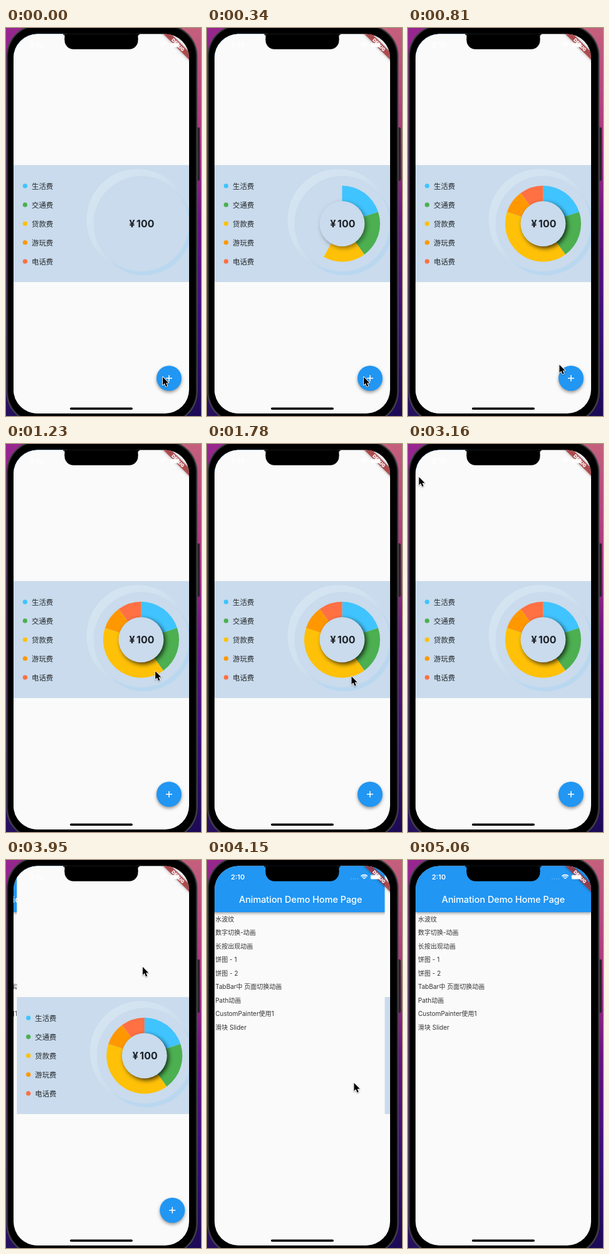
An HTML page with a canvas for the animation above (5160 ms loop, 311 px wide and 617 px high).

```html
<!DOCTYPE html>
<html lang="zh">
<head>
<meta charset="utf-8">
<style>
  html, body { margin: 0; width: 100%; height: 100%; overflow: hidden; background: #000; }
  canvas { display: block; width: 311px; height: 617px; }
</style>
</head>
<body>
<canvas id="stage"></canvas>
<script>
const W = 311, H = 617, LOOP = 5160, TURN = 2 * Math.PI;
const CJK = "'Noto Sans CJK SC', 'Noto Sans CJK', sans-serif";
const SANS = `Inter, ${CJK}`;
const SCREEN = { x: 12, y: 9.5, w: 280, h: 603.5, r: 38 };
const PAPER = '#fafafa', PANEL = '#c9dbec', BLUE = '#2196f3';
const PIE = { x: 215.5, y: 311.2, r: 60.5, hole: 36 };

const canvas = document.getElementById('stage');
const dpr = window.devicePixelRatio || 1;
canvas.width = W * dpr;
canvas.height = H * dpr;
const c = canvas.getContext('2d');

const EXPENSES = [
  ['生活费', '#40c4ff', 0.2],
  ['交通费', '#4caf50', 0.2],
  ['贷款费', '#ffc107', 0.4],
  ['游玩费', '#ff9800', 0.1],
  ['电话费', '#ff7043', 0.1],
];
const MENU = ['水波纹', '数字切换-动画', '长按出现动画', '饼图 - 1', '饼图 - 2',
  'TabBar中 页面切换动画', 'Path动画', 'CustomPainter使用1', '滑块 Slider'];

// Where the pointer rests or turns
const POINTER = [
  { t: 480, x: 250, y: 555 },
  { t: 810, x: 241.5, y: 535.5 },
  { t: 960, x: 187, y: 281 },
  { t: 1170, x: 251, y: 390 },
  { t: 1290, x: 226, y: 334 },
  { t: 1440, x: 226, y: 334 },
  { t: 1780, x: 230.5, y: 369.5 },
  { t: 2190, x: 243, y: 620 },
  { t: 2760, x: 233, y: 620 },
  { t: 3160, x: 17.5, y: 52.5 },
  { t: 3600, x: 16, y: 152 },
  { t: 3770, x: 20, y: 153 },
  { t: 3950, x: 218, y: 170 },
  { t: 4150, x: 234.5, y: 354.5 },
  { t: 4410, x: 236, y: 400 },
  { t: 4610, x: 250, y: 620 },
];

const clamp01 = v => Math.max(0, Math.min(1, v));
const smooth = p => p * p * (3 - 2 * p);

function pointerAt(t) {
  const next = POINTER.findIndex(key => key.t > t);
  if (next === 0) return POINTER[0];
  const a = POINTER[next - 1], b = POINTER[next];
  const p = smooth((t - a.t) / (b.t - a.t));
  return { x: a.x + (b.x - a.x) * p, y: a.y + (b.y - a.y) * p };
}

// The page flies out with exponential decay, refreshed only every 100 ms
function pageOffset(t) {
  const age = Math.floor((t - 3950) / 100) * 100;
  if (age < 0) return 0;
  return age > 600 ? SCREEN.w : SCREEN.w - 274.7 * Math.exp(-age / 57.5);
}

function disc(x, y, r, fill) {
  c.beginPath();
  c.arc(x, y, r, 0, TURN);
  c.fillStyle = fill;
  c.fill();
}

function box(x, y, w, h, r, fill) {
  c.beginPath();
  c.roundRect(x, y, w, h, r);
  c.fillStyle = fill;
  c.fill();
}

function label(text, x, y, font, fill, align = 'left') {
  c.font = font;
  c.fillStyle = fill;
  c.textAlign = align;
  c.fillText(text, x, y);
}

function shifted(x, y, draw) {
  c.save();
  c.translate(x, y);
  draw();
  c.restore();
}

function withShadow(color, blur, dx, dy, draw) {
  c.save();
  c.shadowColor = color;
  c.shadowBlur = blur * dpr;
  c.shadowOffsetX = dx * dpr;
  c.shadowOffsetY = dy * dpr;
  draw();
  c.restore();
}

// Colours spread evenly along the line
function gradient(x0, y0, x1, y1, ...colors) {
  const g = c.createLinearGradient(x0, y0, x1, y1);
  colors.forEach((color, i) => g.addColorStop(i / (colors.length - 1), color));
  return g;
}

function drawPhone() {
  c.fillStyle = gradient(0, 0, 0, H, '#98268f', '#6c1787', '#25105c');
  c.fillRect(0, 0, W / 2, H);
  c.fillStyle = gradient(0, 0, 0, H, '#c4607c', '#b03a80', '#6a1283', '#3a0f7c', '#1c0a55');
  c.fillRect(W / 2, 0, W / 2, H);
  box(304, 158, 5, 85, 2, '#2b2029');
  box(0.5, -5.5, 305, 634, 50, '#48484b');
  box(2, -4, 302, 631, 49, '#1c1c1e');
  box(3.5, -2.5, 299, 628, 47, '#000');
}

function drawHome() {
  c.fillStyle = PAPER;
  c.fillRect(12, 9, 280, 605);
  withShadow('rgba(0,0,0,.35)', 4, 0, 1.5, () => box(12, 9, 280, 74, 0, BLUE));
  label('Animation Demo Home Page', 152, 68, `500 14.4px ${SANS}`, '#fff', 'center');
  MENU.forEach((item, i) => label(item, 16, 97.5 + i * 21.5, `10px ${SANS}`, '#333'));
}

function drawDial() {
  const { x, y } = PIE;
  disc(x - 6, y - 6, 81, gradient(150, 250, 262, 362, '#d5e4f1', '#d2e2f0', PANEL, PANEL));
  disc(x + 4, y + 5, 77, gradient(210, 310, 240, 340, 'rgba(185,214,240,0)', '#bad7f0'));
  disc(x, y, 76, PANEL);
}

function drawPie(progress) {
  const { x, y, r, hole } = PIE;
  let from = 0;
  for (const [, color, share] of EXPENSES) {
    const to = Math.min(from + share, progress);
    if (to > from) {
      c.beginPath();
      c.moveTo(x, y);
      c.arc(x, y, r, (from - 0.25) * TURN, (to - 0.25) * TURN);
      c.fillStyle = color;
      c.fill();
    }
    from += share;
  }
  if (progress > 0) {
    withShadow(`rgba(0,0,0,${0.7 * progress})`, 7, 3, 3, () => disc(x, y, hole, PANEL));
  }
  label('¥', 201, 317, `700 16px ${SANS}`, '#1d2126', 'center');
  label('100', 208, 317, `700 16px ${SANS}`, '#1d2126');
}

function drawChartPage(progress) {
  c.fillStyle = PAPER;
  c.fillRect(12, 9, 280, 605);
  box(12, 218, 280, 186, 0, PANEL);
  drawDial();
  drawPie(progress);
  EXPENSES.forEach(([name, color], i) => {
    const y = 251.2 + i * 30;
    disc(30.4, y, 3.6, color);
    label(name, 41, y + 4.3, `11.4px ${CJK}`, '#25282c');
  });
  withShadow('rgba(0,0,0,.4)', 5, 0, 2.5, () => disc(260, 557, 20, BLUE));
  box(255, 556.3, 10, 1.5, 0, '#fff');
  box(259.25, 552, 1.5, 10, 0, '#fff');
}

function drawBanner() {
  shifted(291.5, 9.5, () => {
    c.rotate(Math.PI / 4);
    withShadow('rgba(0,0,0,.5)', 4, 0, 0, () => box(-45, 20, 90, 8.7, 0, 'rgba(176,50,54,.78)'));
    label('DEBUG', 0, 27, `900 7.3px ${SANS}`, '#fff', 'center');
  });
}

function drawStatus() {
  label('2:10', 38, 31, `600 11px ${SANS}`, '#fff');
  for (let i = 0; i < 4; i++) disc(230 + i * 3.6, 30, 0.8, 'rgba(255,255,255,.4)');
  c.strokeStyle = '#fff';
  c.lineWidth = 1.6;
  for (let i = 0; i < 3; i++) {
    c.beginPath();
    c.arc(250.7, 31, 2.2 + i * 2.6, -0.375 * TURN, -0.125 * TURN);
    c.stroke();
  }
  box(260.5, 23.3, 16, 7.8, 2, 'rgba(255,255,255,.5)');
  box(261.6, 24.4, 13.8, 5.6, 1.2, '#fff');
}

function drawNotch() {
  box(93.5, 5, 117, 28.8, 14, '#000');
  box(93.5, 5, 117, 14, 0, '#000');
  box(91, 5, 122, 6.5, 2, '#000');
}

function drawPointer({ x, y }) {
  const arrow = new Path2D('M0 0V12.8L2.9 10.1 5.1 15.2 7.3 14.2 5.2 9.4 9.2 9.2Z');
  shifted(x, y, () => {
    c.lineJoin = 'round';
    c.lineWidth = 1.8;
    c.strokeStyle = '#fff';
    withShadow('rgba(0,0,0,.35)', 2, 0, 1, () => c.stroke(arrow));
    c.fillStyle = '#000';
    c.fill(arrow);
  });
}

function render(t) {
  const progress = t < 60 ? 0 : clamp01((t - 10) / 570);
  const offset = pageOffset(t);
  c.setTransform(dpr, 0, 0, dpr, 0, 0);
  drawPhone();
  c.save();
  c.beginPath();
  c.roundRect(SCREEN.x, SCREEN.y, SCREEN.w, SCREEN.h, SCREEN.r);
  c.clip();
  shifted((offset - SCREEN.w) / 3, 0, drawHome);
  shifted(offset, 0, () => drawChartPage(progress));
  drawBanner();
  drawStatus();
  drawNotch();
  box(102, 603.4, 100, 3.5, 1.7, '#000');
  c.restore();
  if (t < 4610) drawPointer(pointerAt(t));
}

function tick() {
  render(performance.now() % LOOP);
  requestAnimationFrame(tick);
}
tick();
</script>
</body>
</html>
```
